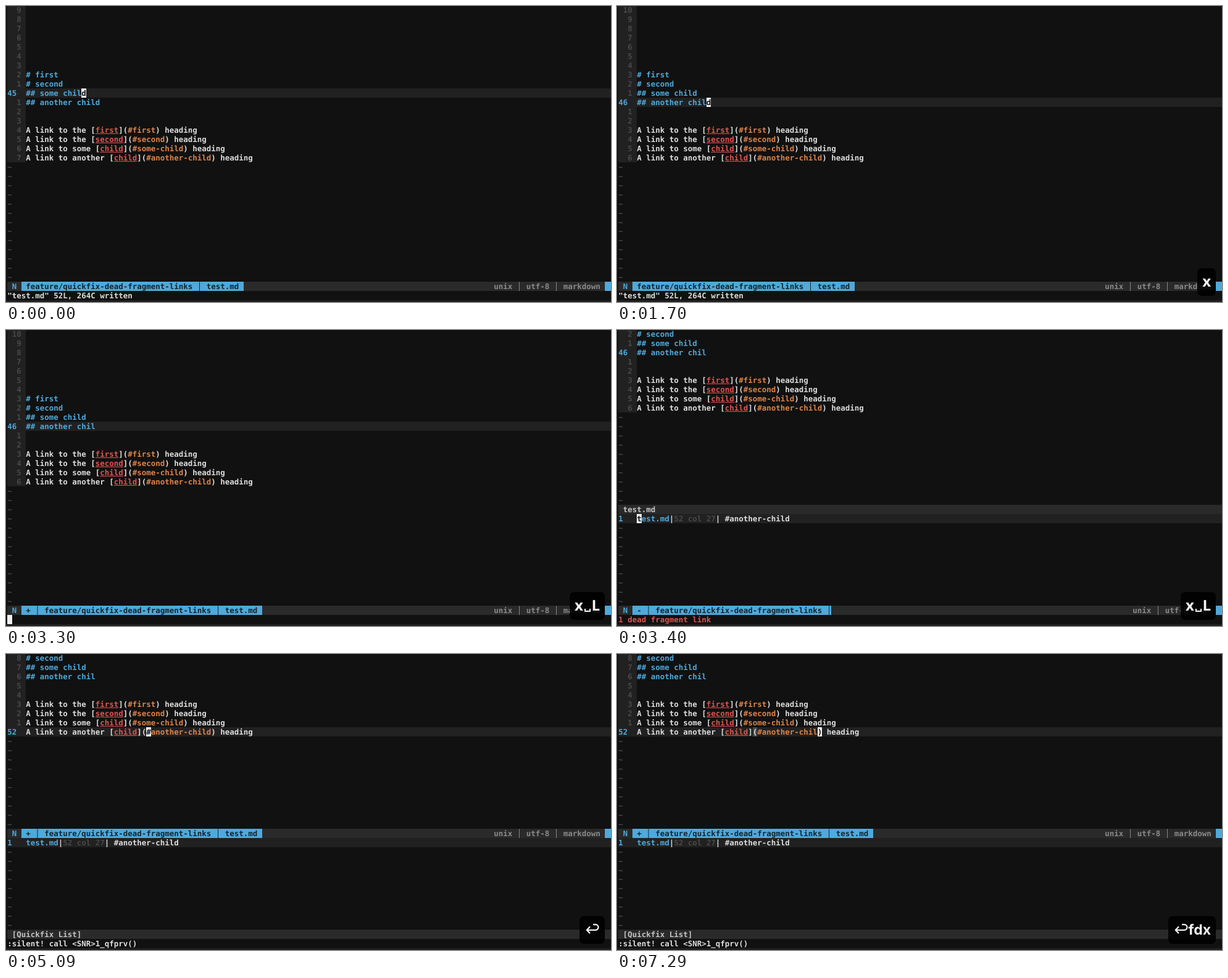
An HTML page for the animation above (8 s loop, 980 by 481 pixels).

```html
<!DOCTYPE html>
<html lang="en">
<head>
<meta charset="utf-8">
<title>Dead fragment links</title>
<style>
html, body { margin: 0; width: 100%; height: 100%; overflow: hidden; background: #111; }
#stage { position: relative; width: 980px; height: 481px; overflow: hidden; background: #111;
  font: bold 12.466px/15px "DejaVu Sans Mono", monospace; color: #dcdcdc;
  text-rendering: geometricPrecision; }
#stage::after { content: ""; position: absolute; left: 0; right: 0; bottom: 0; height: 3px; background: #211e20; }
.scene { position: absolute; inset: 0; visibility: hidden; }
.row { position: absolute; left: 2.3px; right: 0; height: 15px; white-space: pre; }
.row span, .row i { display: inline-block; height: 15px; font-style: normal; }
.line { background: #212121; }
.num { width: 30px; background: #212121; color: #484848; }
.dim { color: #484848; }
.blue, .now .num { color: #4fa9da; }
.red { color: #df5450; }
.row u { color: #df5450; }
.orange { color: #de8349; }
.row .match { background: #484848; }
.row i { background: #f0f0f0; color: #111; }
.bar { background: #2a2a2a; color: #c4c4c4; }
.bar .seg { background: #4fa9da; color: #16242c; }
.bar .info { position: absolute; color: #8a8a8a; }
.bar .end { position: absolute; left: 967.7px; right: 0; background: #4fa9da; }
.key { position: absolute; right: 10px; top: 426px; height: 45px; padding: 0 8px; visibility: hidden;
  border-radius: 7px; background: rgba(0, 0, 0, .88); color: #f6f6f6; white-space: nowrap;
  font: bold 24px/43px "Open Sans", "Noto Sans", sans-serif; }
.key b { font: bold 23px/43px Inter, sans-serif; }
.key s { display: inline-block; box-sizing: border-box; width: 10px; height: 5px; margin: 0 1.8px;
  vertical-align: -2px; border: solid #f6f6f6; border-width: 0 2px 2px; }
.key svg { width: 25px; height: 45px; vertical-align: top; fill: none; stroke: #f6f6f6; stroke-width: 2.2; }
</style>
</head>
<body>
<div id="stage"></div>
<script>
const LOOP = 8000, ROW = 14.97, CELL = 7.505, FIRST_HEADING = 43, LAST_LINE = 52;
const stage = document.getElementById('stage');
const css = [];

const tag = (cls, text) => `<span class="${cls}">${text}</span>`;
const cur = ch => `<i>${ch}</i>`;
const row = (r, html, cls = '') =>
  `<div class="row ${cls}" style="top:${(r * ROW - 0.8).toFixed(2)}px">${html}</div>`;
const link = (pre, label, frag, open = '(', close = ')') =>
  `A link to ${pre} [<u>${label}</u>]${open}${tag('orange', frag)}${close} heading`;

// Text lines of the file from the first heading on
const doc = ({ some = 'child', another = 'chil', last = link('another', 'child', '#another-child') } = {}) => [
  ...['# first', '# second', '## some ' + some, '## another ' + another].map(h => tag('blue', h)),
  '', '',
  link('the', 'first', '#first'),
  link('the', 'second', '#second'),
  link('some', 'child', '#some-child'),
  last
];

const tildes = (from, to) => {
  let html = '';
  for (let r = from; r < to; r++) html += row(r, '~', 'dim');
  return html;
};

// Buffer window with relative line numbers
function buffer(top, now, lines, end, focused = true) {
  let html = '';
  for (let n = top; n <= LAST_LINE; n++) {
    const here = n === now;
    const num = here ? String(n) : String(Math.abs(n - now)).padStart(3);
    html += row(n - top, tag('num', num) + (lines[n - FIRST_HEADING] || ''),
      here ? (focused ? 'now line' : 'now') : '');
  }
  return html + tildes(LAST_LINE - top + 1, end);
}

function status(r, flag, file, info) {
  const parts = [flag, 'feature/quickfix-dead-fragment-links', file].filter(Boolean);
  const seg = ' ' + parts.join(' │ ') + (file ? ' ' : ' │');
  const right = info.join(' │ ');
  const left = (128 - right.length) * CELL;
  return row(r, tag('blue', ' N ') + tag('seg', seg) +
    `<span class="info" style="left:${left}px">${right}</span><span class="end"></span>`, 'bar');
}

const MD = ['unix', 'utf-8', 'markdown'];
const WRITTEN = '"test.md" 52L, 264C written';

const full = (now, text, flag, cmd) =>
  buffer(36, now, doc(text), 30) + status(30, flag, 'test.md', MD) + row(31, cmd);

const list = name =>
  row(20, tag('num blue', '1') + tag('blue', name) + '|' + tag('dim', '52 col 27') + '| #another-child', 'line now') +
  tildes(21, 30);

const jumped = last =>
  buffer(44, 52, doc({ last }), 19) + status(19, '+', 'test.md', MD) + list('test.md') +
  row(30, ' [Quickfix List]', 'bar') + row(31, ':silent! call &lt;SNR&gt;1_qfprv()');

const scenes = [
  [0, full(45, { some: 'chil' + cur('d'), another: 'child' }, '', WRITTEN)],
  [100, full(46, { another: 'chil' + cur('d') }, '', WRITTEN)],
  [1800, full(46, { another: 'chi' + cur('l') }, '+', WRITTEN)],
  [3300, full(46, {}, '+', cur(' '))],
  [3400, buffer(44, 46, doc(), 19, false) + row(19, ' test.md', 'bar') + list(cur('t') + 'est.md') +
    status(30, '-', '', ['unix', 'utf-8', 'qf']) + row(31, '1 dead fragment link', 'red')],
  [4890, jumped(link('another', 'child', cur('#') + 'another-child'))],
  [6190, jumped(link('another', 'child', '#another-chil' + cur('d')))],
  [7290, jumped(link('another', 'child', '#another-chil', tag('match', '('), cur(')')))]
];

const enter = '<svg viewBox="0 0 25 45"><path d="M14 13.6h4a4.5 4.5 0 0 1 0 9H4M9 17l-5.2 5.6L9 28"/></svg>';
const keys = [
  [100, 'j'],
  [1700, 'x'],
  [3100, 'x<s></s>'],
  [3300, 'x<s></s>L'],
  [4790, enter],
  [6090, enter + '<b>f</b>'],
  [6190, enter + '<b>fd</b>'],
  [7290, enter + '<b>fdx</b>']
];

const pct = t => Math.max(0, (t - 1) / LOOP * 100) + '%';

// Each layer is visible from its own start until the next one begins
function play(items, cls) {
  items.forEach(([start, html], i) => {
    const end = i + 1 < items.length ? items[i + 1][0] : LOOP + 1;
    const name = cls + i;
    const before = start ? '0% { visibility: hidden }' : '';
    css.push(`@keyframes ${name} { ${before} ${pct(start)} { visibility: visible }
      ${pct(end)} { visibility: ${end > LOOP ? 'visible' : 'hidden'} } }
      #${name} { animation: ${name} ${LOOP}ms step-end infinite }`);
    stage.insertAdjacentHTML('beforeend', `<div class="${cls}" id="${name}">${html}</div>`);
  });
}

play(scenes, 'scene');
play(keys, 'key');
css.push(`@keyframes fade { 0% { opacity: .33 } ${pct(200)} { opacity: .67 } ${pct(300)} { opacity: 1 } 100% { opacity: 1 } }
  #key0 { animation: key0 ${LOOP}ms step-end infinite, fade ${LOOP}ms step-end infinite }`);

const sheet = document.createElement('style');
sheet.textContent = css.join('\n');
document.head.append(sheet);
</script>
</body>
</html>
```
